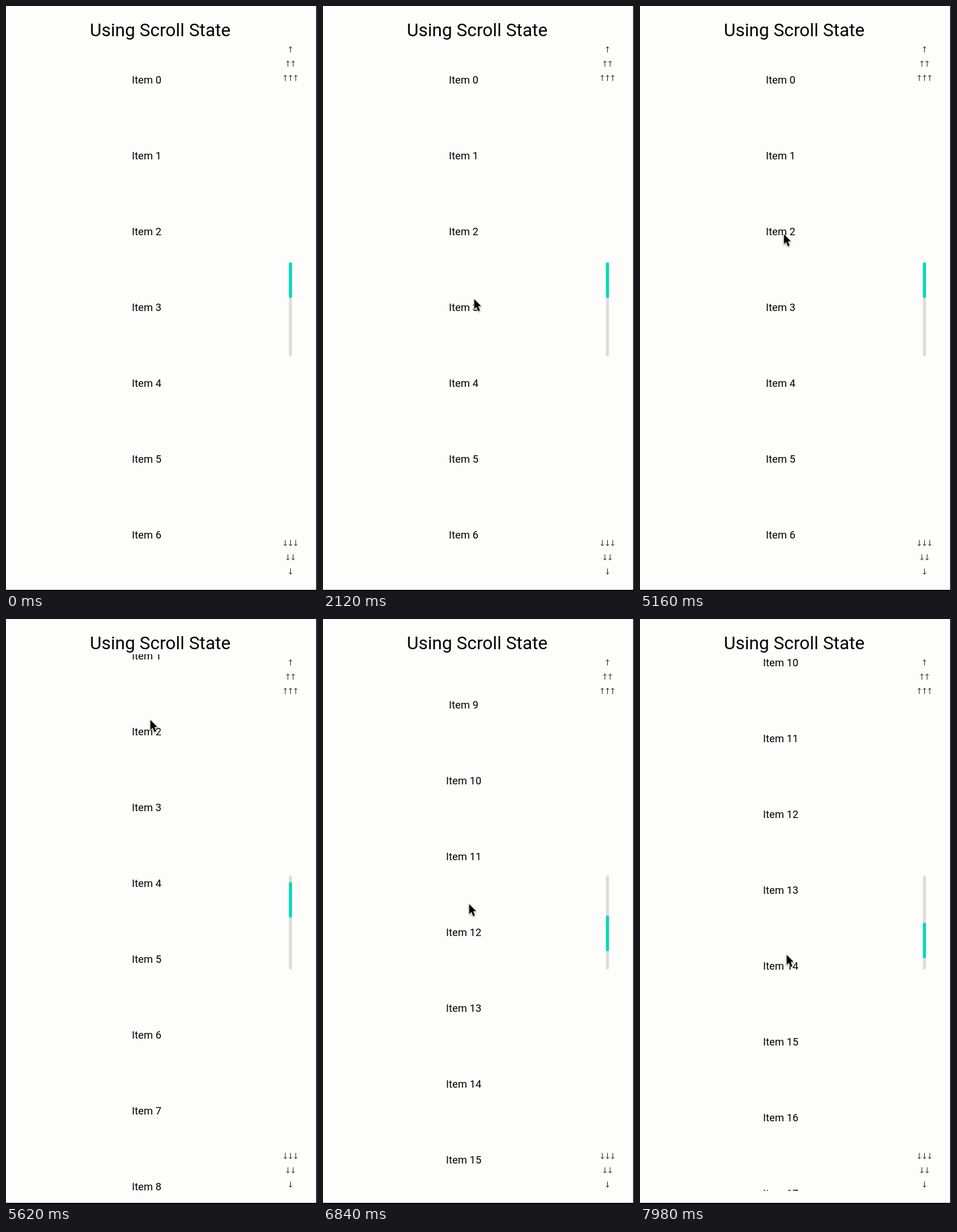
Animation of 546 by 1026 pixels, one loop 8000 ms. Source, as an HTML page:

```html
<!DOCTYPE html>
<html lang="en">
<head>
<meta charset="utf-8">
<title>Scroll state</title>
<style>
  html, body { margin: 0; width: 100%; height: 100%; overflow: hidden; background: #fdfdfc; }
  svg { display: block; width: 546px; height: 1026px; }
  text { font-family: Roboto, sans-serif; text-anchor: middle; fill: #000; }
  .title { font-size: 31.5px; }
  #list text { font-size: 18.4px; }
  .arrow { fill: none; stroke: #111; }
  #cursor { filter: drop-shadow(0 1.5px 1.5px rgba(0, 0, 0, .4)); }
</style>
</head>
<body>
<svg viewBox="0 0 546 1026">
  <defs>
    <clipPath id="view"><rect y="62" width="546" height="941"/></clipPath>
    <path id="up" class="arrow" d="M0 5.5V-4.5M-2.7 -1.8L0 -4.7L2.7 -1.8"/>
  </defs>
  <rect width="546" height="1026" fill="#fdfdfc"/>
  <g clip-path="url(#view)"><g id="list"></g></g>
  <text class="title" x="270.8" y="53">Using Scroll State</text>
  <g id="arrows"></g>
  <rect x="496.7" y="449.5" width="5.4" height="165.2" rx="2.7" fill="#dcdcdc"/>
  <rect id="thumb" x="496.7" y="449.5" width="5.4" height="62.5" rx="2.7" fill="#02dab8"/>
  <path d="M544.6 0H546V1026H0V1024H544.6Z"/>
  <g id="cursor">
    <path d="M.5 2V19.5L4.5 15.8L7.5 23.2L10.6 21.9L7.5 14.6L12.6 14.3Z"
          stroke="#fff" stroke-width="1.5" paint-order="stroke"/>
  </g>
</svg>
<script>
const LOOP = 8000, ROW = 133.08;
const $ = id => document.getElementById(id);
const add = (parent, tag, attrs) => {
  const el = document.createElementNS('http://www.w3.org/2000/svg', tag);
  for (const k in attrs) el.setAttribute(k, attrs[k]);
  return parent.appendChild(el);
};

for (let i = 0; i < 20; i++) {
  add($('list'), 'text', { x: 247, y: 135.6 + i * ROW }).textContent = 'Item ' + i;
}

for (let n = 1; n <= 3; n++) {
  for (let i = 0; i < n; i++) {
    const x = 499.5 + (i - (n - 1) / 2) * 9.2, dy = (n - 1) * 25;
    add($('arrows'), 'use', { href: '#up', transform: `translate(${x} ${76 + dy})` });
    add($('arrows'), 'use', { href: '#up', transform: `translate(${x} ${992 - dy}) scale(1 -1)` });
  }
}

// Each glide eases the pointer from where it rests to a new spot
const GLIDES = [
  { from: 400, to: 1190, x: 266, y: 773 },
  { from: 1640, to: 2170, x: 265, y: 512 },
  { from: 3475, to: 3960, x: 257, y: 414 },
  { from: 4420, to: 4740, x: 252, y: 451 },
  { from: 5020, to: 5520, x: 253, y: 175 },
  { from: 6180, to: 7123, x: 257, y: 587 }
];

function pointer(t) {
  let x = 232, y = 663;
  for (const g of GLIDES) {
    const u = Math.min(1, Math.max(0, (t - g.from) / (g.to - g.from)));
    const e = u * u * (3 - 2 * u);
    x += (g.x - x) * e;
    y += (g.y - y) * e;
  }
  return [x, y];
}

// Drag accelerates, then the fling decays exponentially
function scrollAt(t) {
  if (t < 5280) return 0;
  if (t < 5700) return 238 * ((t - 5280) / 420) ** 2.82;
  return 1439 - 668 * Math.exp((6140 - t) / 750);
}

// Updates come in bursts of three, 20 ms apart, every 140 ms
function stepTime(t) {
  const n = Math.floor((t - 400) / 140), r = t - 400 - n * 140;
  return 400 + n * 140 + Math.min(2, Math.floor(r / 20)) * 140 / 3;
}

const start = performance.now();
function draw(now) {
  const t = Math.max(0, now - start) % LOOP;
  const s = stepTime(t), y = scrollAt(s);
  $('list').setAttribute('transform', `translate(0 ${-y})`);
  $('thumb').setAttribute('y', 449.5 + y * .06);
  $('cursor').style.visibility = t < 400 ? 'hidden' : 'visible';
  $('cursor').setAttribute('transform', `translate(${pointer(s)})`);
  requestAnimationFrame(draw);
}
draw(start);
</script>
</body>
</html>
```
